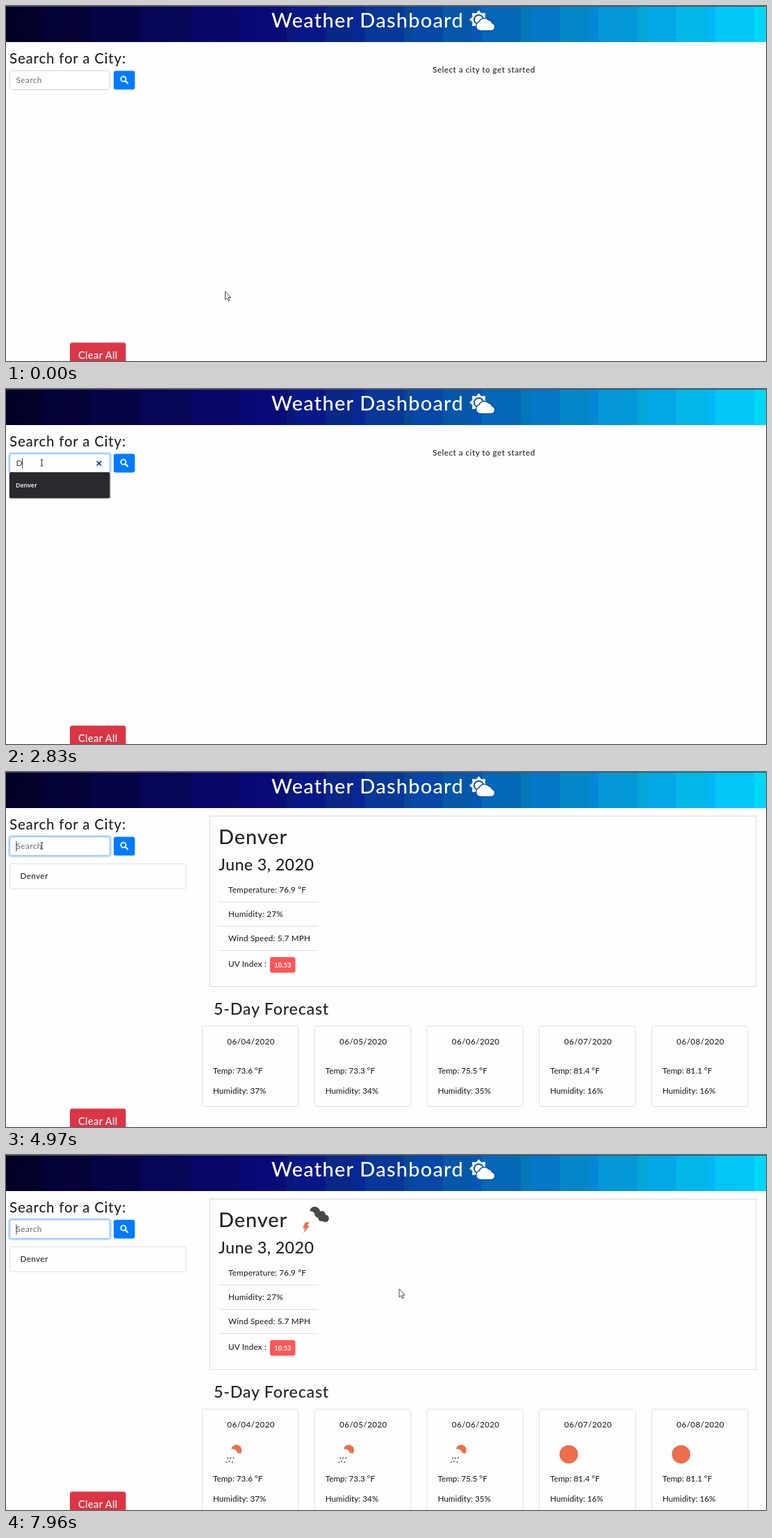
An HTML page that plays this animation: 1094x512 px, repeating every 8 s.

```html
<!DOCTYPE html>
<html lang="en">
<head>
<meta charset="utf-8">
<title>Weather Dashboard</title>
<style>
html, body { margin: 0; width: 100%; height: 100%; overflow: hidden; background: #fefefe; }
svg { display: block; width: 100%; height: 100%; }
text { font: 500 11.7px Lato, sans-serif; fill: #212529; white-space: pre; }
.title { font-size: 29px; letter-spacing: .042em; }
.city { font-size: 29px; letter-spacing: .03em; }
.white { fill: #fff; }
.heading { font-size: 20.5px; letter-spacing: .038em; }
.subhead { font-size: 23.4px; letter-spacing: .015em; }
.forecast { letter-spacing: .03em; }
.wide { letter-spacing: .042em; }
.date { letter-spacing: .033em; }
.field { letter-spacing: .04em; fill: #6c757d; }
.typed { fill: #495057; }
.detail { letter-spacing: .015em; }
.clear { font-size: 14.6px; letter-spacing: .025em; }
.badge { font-size: 9.5px; font-weight: 700; }
.option { font: 600 8.8px "Open Sans", sans-serif; fill: #fff; }
.box { fill: none; stroke: #dfdfdf; }
.rule { stroke: #dcdfe2; }
.hide { display: none; }
</style>
</head>
<body>
<svg viewBox="0 0 1094 512" preserveAspectRatio="none">
  <defs>
    <g id="shower">
      <path fill="#ec6e4c" d="M324.5 424C325 420 329 417.5 333 418.2C337.5 419 340 423 339 427.5L337.5 431C336 429.5 334.5 429.5 333 430C333 426 329 423.5 324.5 424Z"/>
      <path stroke="#48484a" stroke-width="1.4" d="M320 436l-1.2 2M324 436l-1.2 2M328 436l-1.2 2M318 442l-1.2 2M322 441l-1.2 2M326.5 442l-1.2 2"/>
    </g>
    <circle id="sunny" cx="324.8" cy="431.7" r="13.3" fill="#ec6e4c"/>
  </defs>

  <g id="bands"></g>
  <path d="M0 .5H1094" stroke="#4a4f5c"/>
  <text class="title white" x="382" y="31">Weather Dashboard</text>
  <g fill="#fff">
    <path id="rays"/>
    <circle cx="680.5" cy="19.5" r="7.6" fill="#0553a8"/>
    <circle cx="680.5" cy="19.5" r="5.6"/>
    <path stroke="#0553a8" stroke-width="3" paint-order="stroke" d="M683 35A6 6 0 0 1 681.6 23.3A7.6 7.6 0 0 1 694.5 21A5 5 0 0 1 699 25.2A5 5 0 0 1 699 35Z"/>
  </g>

  <text class="heading" x="5" y="83">Search for a City:</text>
  <rect id="glow" x="3" y="91" width="149" height="32" rx="5" fill="#bfdeff"/>
  <rect id="input" x="5.5" y="93.5" width="144" height="27" rx="3" fill="#fff"/>
  <text id="query" class="field" x="14.5" y="111"></text>
  <path id="caret" stroke="#333" d="M0 100V114.5"/>
  <path id="cross" stroke="#2350a0" stroke-width="2" d="M130.7 104l6.4 6.4m0-6.4l-6.4 6.4"/>
  <rect x="155" y="93.5" width="30.5" height="27" rx="3" fill="#007bff"/>
  <g fill="none" stroke="#fff">
    <circle cx="169" cy="105.3" r="3.6" stroke-width="1.8"/>
    <path stroke-width="2.3" d="M171.7 108l4 4"/>
  </g>
  <g id="menu">
    <rect id="menuShade" x="4" y="121" width="147" rx="3" fill="#000" opacity=".16"/>
    <rect id="menuBox" x="5" y="120" width="144.5" rx="2" fill="#292a2d"/>
    <text class="option" x="14" y="142">Denver</text>
    <text id="other" class="option" x="14" y="168">Chicago</text>
  </g>
  <g id="history">
    <rect class="box" x="5.5" y="132.5" width="253.5" height="36" rx="3"/>
    <text class="date" x="20.5" y="154">Denver</text>
  </g>
  <rect x="92" y="485.5" width="80.5" height="40" rx="3.5" fill="#dc3545"/>
  <text class="clear white" x="104" y="508.5">Clear All</text>
  <text id="hint" class="wide" x="614" y="96">Select a city to get started</text>

  <g id="panel">
    <rect id="frame" class="box" style="stroke:#d9d9d9" x="293.5" y="63.5" width="786.5"/>
    <path id="emptyRules" class="rule" d="M306 103.5h29M306 121.5h29M306 140h29"/>
    <g id="current">
      <text class="city" x="306" y="103.5">Denver</text>
      <text class="subhead" x="306" y="141.5">June 3, 2020</text>
      <path class="rule" d="M306 187.5h143M306 222.5h143M306 257.5h143"/>
      <text class="detail" x="320" y="174">Temperature: 76.9 °F</text>
      <text class="detail" x="320" y="209">Humidity: 27%</text>
      <text class="detail" x="320" y="244">Wind Speed: 5.7 MPH</text>
    </g>
    <g id="uv">
      <text class="detail" x="320" y="281">UV Index :</text>
      <rect x="380" y="267" width="36.5" height="22.5" rx="3" fill="#ff5757"/>
      <text class="badge white" x="386.3" y="282.4">10.53</text>
    </g>
    <g id="storm">
      <path fill="#48484a" d="M437.5 81C438 75.5 443 73.5 447 75C450.5 76.3 452 79 452 81.5C456 79.5 460 82 460 86.5C464 86 466 91 464 94.5C462 97.5 458 97 455.5 95.5C452 96 449 94 449.5 90.5C446 90 444 87 444 84C442 81.5 440 81 437.5 81Z"/>
      <path fill="#ec6e4c" d="M430.5 97.5L437 96.5L433.5 102L437 102L428 113L430.5 105.5L427 105.5Z"/>
    </g>
    <g id="forecast">
      <text class="subhead forecast" x="299" y="350">5-Day Forecast</text>
      <g id="cards"></g>
    </g>
  </g>

  <path id="arrow" fill="#fff" stroke="#333" stroke-width=".9" d="M.5 .7V12.6L3.2 10.2L5.2 14.4L7 13.6L5.1 9.5H8.6Z"/>
  <path id="beam" fill="none" stroke="#333" d="M-2 -4.5H2M-2 4.5H2M0 -4.5V4.5"/>
</svg>
<script>
const $ = id => document.getElementById(id);
const show = (id, on) => $(id).classList.toggle('hide', !on);
const move = (id, x, y) => $(id).setAttribute('transform', `translate(${x} ${y})`);
const LOOP = 8000, WIDTH = 1094;

// Header: a three-stop gradient, each channel reduced to 16 levels
const stops = [[2, 0, 36], [9, 9, 121], [0, 212, 255]];
const posterize = v => Math.min(255, Math.floor((v + 1) / 16) * 16 + 7);
function bandColor(x) {
  const p = x / WIDTH, first = p < .35;
  const k = first ? p / .35 : (p - .35) / .65;
  const [a, b] = first ? stops : stops.slice(1);
  const [r, g, blue] = a.map((v, i) => v + (b[i] - v) * k);
  return `rgb(${Math.round(r)},${g < 15 ? Math.round(g) : posterize(g)},${posterize(blue)})`;
}
let bands = '';
for (let x = 0; x < WIDTH; x++) {
  bands += `<rect x="${x}" width="1" height="52" fill="${bandColor(x)}" shape-rendering="crispEdges"/>`;
}
$('bands').innerHTML = bands;

$('rays').setAttribute('d', 'M' + Array.from({ length: 16 }, (_, i) => {
  const r = i % 2 ? 9.8 : 13.5, a = i * Math.PI / 8;
  return `${680.5 + r * Math.cos(a)} ${19.5 + r * Math.sin(a)}`;
}).join('L') + 'Z');

const days = [
  { temp: 73.6, humidity: 37, icon: 'shower' },
  { temp: 73.3, humidity: 34, icon: 'shower' },
  { temp: 75.5, humidity: 35, icon: 'shower' },
  { temp: 81.4, humidity: 16, icon: 'sunny' },
  { temp: 81.1, humidity: 16, icon: 'sunny' }
];
$('cards').innerHTML = days.map(({ temp, humidity, icon }, i) => `
  <g transform="translate(${i * 161.75} 0)">
    <rect class="box card" x="282.5" y="366.5" width="138.5" rx="3"/>
    <text class="date" x="318.3" y="393">06/0${4 + i}/2020</text>
    <use class="icon" href="#${icon}"/>
    <g class="stats"><text x="298" y="435">Temp: ${temp} °F</text>
    <text x="298" y="463.7">Humidity: ${humidity}%</text></g>
  </g>`).join('');
const cards = document.querySelectorAll('.card');
const icons = document.querySelectorAll('.icon');
const stats = document.querySelectorAll('.stats');

// Pointer: cubic curves, followed in equal hard steps
const moves = [
  { begin: 430, end: 1350, steps: 6, path: [[341, 391], [290, 240], [120, 60], [49, 107]] },
  { begin: 2040, end: 2440, steps: 2, path: [[49, 107], [50, 107], [51, 107], [51.5, 106.5]] },
  { begin: 5090, end: 5760, steps: 5, path: [[51.5, 106.5], [200, 190], [420, 190], [546, 220]] },
  { begin: 5900, end: 6610, steps: 5, path: [[521, 209], [525, 180], [550, 120], [570.5, 107]] },
  { begin: 6610, end: 7960, steps: 10, path: [[570.5, 107], [635, 105], [655, 200], [565.5, 192.5]] }
];
const cubic = ([a, b, c, d], k) => [0, 1].map(i =>
  (1 - k) ** 3 * a[i] + 3 * (1 - k) ** 2 * k * b[i] + 3 * (1 - k) * k * k * c[i] + k ** 3 * d[i]);

function pointerAt(t) {
  const m = moves.findLast(m => t >= m.begin);
  if (!m) return [315, 411];
  const k = Math.min(1, (t - m.begin) / (m.end - m.begin));
  return cubic(m.path, Math.floor(k * m.steps + 1e-6) / m.steps);
}

function drawPointer(t) {
  const [x, y] = pointerAt(t);
  const overText = x < 150 && y > 65 && y < 121;
  show('arrow', !overText);
  show('beam', overText);
  move(overText ? 'beam' : 'arrow', x, y);
}

function drawSearch(t) {
  const focused = t >= 2040, submitted = t >= 3760;
  const count = submitted || t < 2830 ? 0 : Math.min(6, 1 + Math.floor((t - 2830) / 130));
  const query = $('query');
  query.textContent = count ? 'Denver'.slice(0, count) : 'Search';
  query.classList.toggle('typed', count > 0);
  show('glow', focused);
  $('input').setAttribute('stroke', focused ? '#80bdff' : '#ced4da');
  const blinkOn = !submitted || Math.floor((t - 3760) / 500) % 2 === 0;
  show('caret', focused && blinkOn);
  move('caret', count ? Math.round(14.5 + query.getComputedTextLength()) - .5 : 14.9, 0);
  show('cross', count > 0);

  show('menu', t >= 2240 && t < 3480);
  show('other', count === 0);
  const height = count ? 37.5 : 63.5;
  $('menuBox').setAttribute('height', height);
  $('menuShade').setAttribute('height', height);
}

function drawPanel(t) {
  const current = t >= 4540, uv = t >= 4820, loaded = t >= 5090;
  const shift = uv ? 0 : current ? -22 : -140;
  show('hint', t < 3760);
  show('panel', t >= 3760);
  show('history', current);
  show('current', current);
  show('emptyRules', !current);
  show('uv', uv);
  show('storm', loaded);
  $('frame').setAttribute('height', 246 + shift);
  move('forecast', 0, shift);
  cards.forEach(c => c.setAttribute('height', loaded ? 152.5 : 116));
  icons.forEach(i => i.classList.toggle('hide', !loaded));
  stats.forEach(s => s.setAttribute('transform', `translate(0 ${loaded ? 36.3 : 0})`));
}

const start = performance.now();
function draw() {
  const t = (performance.now() - start) % LOOP;
  drawPointer(t);
  drawSearch(t);
  drawPanel(t);
  requestAnimationFrame(draw);
}
draw();
</script>
</body>
</html>
```
